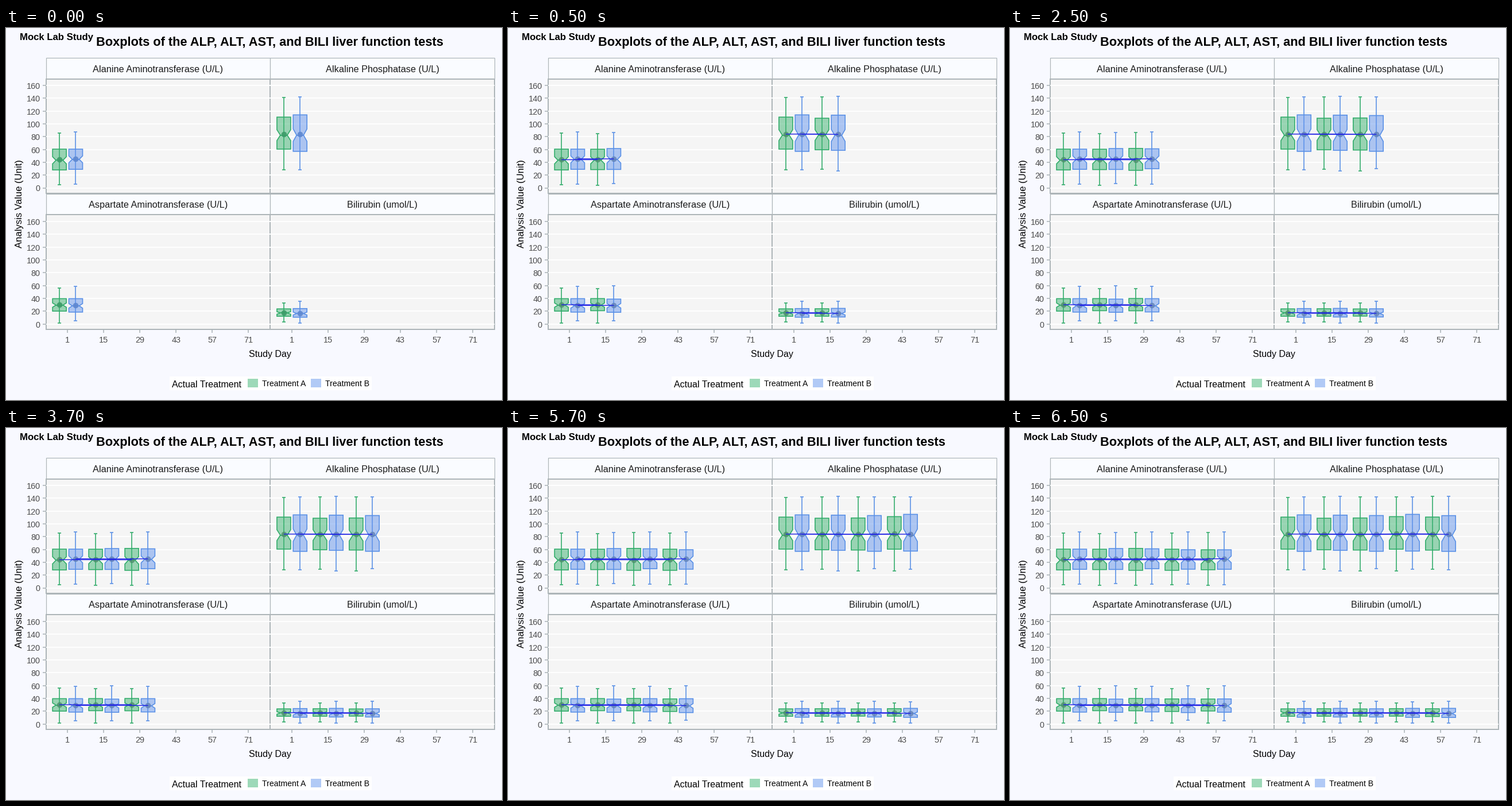
Animation of 864x648 px, one loop 8000 ms. Source, as a matplotlib script:

```python
import random

import matplotlib.pyplot as plt
from matplotlib.animation import FuncAnimation
from matplotlib.patches import Polygon, Rectangle

W, H = 864, 648
INTERVAL, FRAMES = 500, 16
VISITS = 5  # study days that receive boxes
PANEL_W, STEP, DODGE = 390.5, 62.98, 14.17
UNIT = 1.1156
BORDER = "#adb5b8"
ARMS = (("#2fab69", "#3cb371"), ("#588fe6", "#6495ed"))  # outline, fill
FIRST_DOTS = ("#3d9c69", "#5f88d0")
LATER_DOTS = ("#4d8c6b", "#5f7fb4")

plt.rcParams["font.family"] = "Liberation Sans"
fig = plt.figure(figsize=(W / 72, H / 72), dpi=72, facecolor="#f8f9ff")
ax = fig.add_axes([0, 0, 1, 1])
ax.set(xlim=(-0.5, W - 0.5), ylim=(H - 0.5, -0.5))  # integers are pixel centres
ax.axis("off")

day_artists = [[] for _ in range(VISITS)]
first_dots, later_dots, trends = [], [], []


def text(x, y, s, size, ha="center", color="black", **kw):
    return ax.text(x, y, s, size=size, ha=ha, va="baseline", color=color, **kw)


def rect(x0, y0, x1, y1, fill, edge="none", lw=0, z=1):
    ax.add_patch(Rectangle((x0, y0), x1 - x0, y1 - y0, fc=fill, ec=edge, lw=lw, zorder=z))


def line(xs, ys, color, lw, z):
    return ax.plot(xs, ys, color=color, lw=lw, zorder=z, solid_capstyle="butt")[0]


def day_x(left, day):
    return left + (0.6 + day) * STEP


def vary(stats, day, rng):
    """Scatter the first visit's summary a little for each later visit."""
    if day == 0:
        return stats
    low, q1, mean, q3, high = stats
    spread = 0.035 * (q3 - q1)
    low, q1, q3, high = (max(1.5, v + rng.uniform(-spread, spread))
                         for v in (low, q1, q3, high))
    return low, q1, mean + rng.uniform(-spread, spread) / 3, q3, high


def notched_box(x, zero, stats, arm):
    """Draw one box with whiskers; return its artists and the height of its mean."""
    low, q1, mean, q3, high = (zero - UNIT * v for v in stats)
    median = zero - UNIT * stats[2] * 0.98
    notch = 0.17 * (q1 - q3)
    edge, fill = ARMS[arm]
    parts = [line([x, x], [low, high], edge, 1.6, 4)]
    parts += [line([x - 3, x + 3], [y, y], edge, 1.6, 4) for y in (low, high)]
    right = [(12, q1), (12, median + notch), (6, median), (12, median - notch), (12, q3)]
    outline = [(x + dx, y) for dx, y in right]
    outline += [(x - dx, y) for dx, y in reversed(right)]
    parts.append(ax.add_patch(Polygon(outline, fc=fill, ec="none", alpha=0.5, zorder=5)))
    parts.append(ax.add_patch(Polygon(outline, fc="none", ec=edge, lw=1.6, zorder=6)))
    parts.append(line([x - 6, x + 6], [median, median], edge, 1.8, 6))
    return parts, mean


def dot(x, y, color, alpha):
    return ax.plot(x, y, "o", ms=8.6, mfc=color, mec=color, mew=1, alpha=alpha, zorder=7)[0]


def panel(title, left, top, zero, *arm_stats):
    """Each arm gives low, q1, mean, q3 and high at the first visit."""
    rng = random.Random(title)
    right, bottom = left + PANEL_W, top + 199.5
    rect(left, top - 36.5, right, top, "#fafcff", BORDER, 1.2)
    text((left + right) / 2, top - 12, title, 16.2, color="#1a1a1a")
    rect(left, top, right, bottom, "#f5f5f5", BORDER, 2)
    for v in range(0, 161, 20):
        y = zero - UNIT * v
        line([left, right], [y, y], "white", 1.9, 2)
        if left < 100:
            line([left - 6, left], [y, y], BORDER, 1.6, 2)
            text(59, y + 6, str(v), 14.4, "right", "#4d4d4d")

    for arm, stats in enumerate(arm_stats):
        path = []
        for day in range(VISITS):
            x = day_x(left, day) + (DODGE if arm else -DODGE)
            parts, mean = notched_box(x, zero, vary(stats, day, rng), arm)
            path.append((x, mean))
            day_artists[day] += parts
            later_dots.append((day, dot(x, mean, LATER_DOTS[arm], 0.75)))
        first_dots.append(dot(*path[0], FIRST_DOTS[arm], 0.9))
        trends.append((line([], [], "#1f1fe6", 1.4, 8), path))


panel("Alanine Aminotransferase (U/L)", 69, 88, 278,
      (5, 28, 44, 60.5, 86), (6, 29, 45.5, 60.5, 87))
panel("Alkaline Phosphatase (U/L)", 459.8, 88, 278,
      (28, 60.5, 84, 110.5, 141), (28, 57, 84, 114, 142))
panel("Aspartate Aminotransferase (U/L)", 69, 324.8, 515,
      (1.5, 20, 30, 39.5, 56), (5, 18.5, 28.8, 39.5, 59))
panel("Bilirubin (umol/L)", 459.8, 324.8, 515,
      (3, 12, 17.5, 23.5, 33), (1.5, 10.5, 16.6, 24, 35))

for left in (69, 459.8):
    for i in range(6):
        x = day_x(left, i)
        line([x, x], [524, 530], BORDER, 1.6, 2)
        text(x, 548, str(1 + 14 * i), 14.4, color="#4d4d4d")

text(459, 31, "Boxplots of the ALP, ALT, AST, and BILI liver function tests", 21.8, weight="bold")
text(23, 20, "Mock Lab Study", 16.8, "left", weight="bold")
text(459.5, 573, "Study Day", 16)
ax.text(28, 306, "Analysis Value (Unit)", size=16.6, rotation=90,
        rotation_mode="anchor", ha="center", va="baseline")

rect(284, 606, 636.5, 630.5, "white")
text(288.5, 625.5, "Actual Treatment", 16, "left")
for x, name, color in ((420, "Treatment A", "#9dd9b8"), (530, "Treatment B", "#b1caf6")):
    rect(x, 610.5, x + 18, 625, color, z=2)
    text(x + 25, 624, name, 14, "left")


def update(frame):
    latest = (frame + 3) // 4  # one more visit every four frames
    for day, artists in enumerate(day_artists):
        for artist in artists:
            artist.set_visible(day <= latest)
    for marker in first_dots:
        marker.set_visible(latest == 0)
    for day, marker in later_dots:
        marker.set_visible(0 < latest and day <= latest)
    for trend, path in trends:
        trend.set_data(*zip(*path[:latest + 1]))
        trend.set_visible(latest > 0)
    return []


anim = FuncAnimation(fig, update, frames=FRAMES, init_func=lambda: update(0),
                     interval=INTERVAL, repeat=True, repeat_delay=0, blit=False)
plt.show()
```
